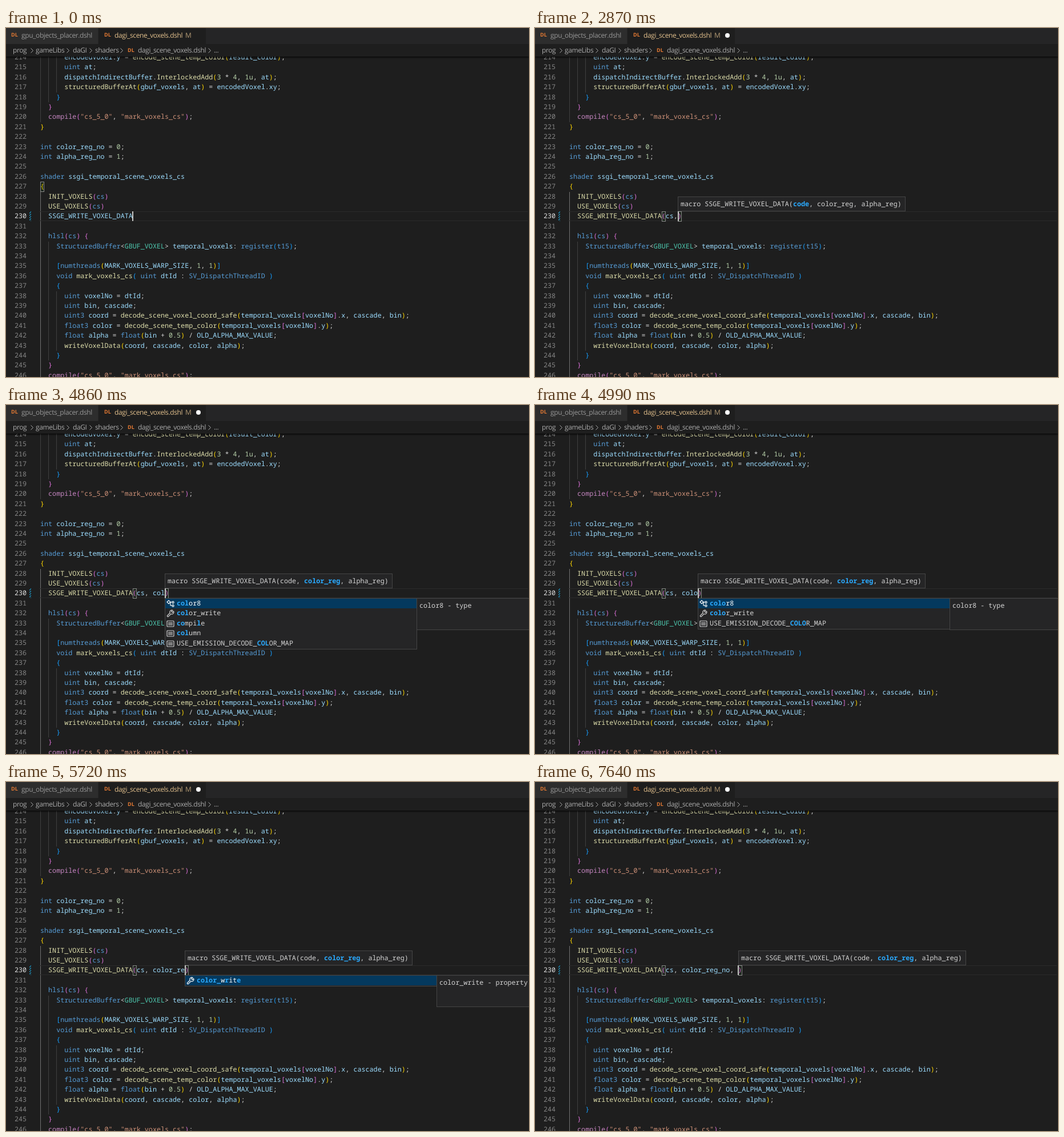
Animation of 916x611 px, one loop 8 s. Source, as an HTML page:

```html
<!DOCTYPE html>
<html lang="en">
<head>
<meta charset="utf-8">
<title>Shader editor</title>
<style>
html, body { margin: 0; width: 100%; height: 100%; overflow: hidden; background: #1e1e1e; }
#stage {
  position: relative; width: 916px; height: 611px; overflow: hidden; background: #1e1e1e;
  color: #d4d4d4; text-rendering: geometricPrecision;
  font: 500 11.733px/17.4px "Noto Sans Mono", monospace;
}
#stage div, #stage svg, .ui { position: absolute; }
#stage div, .ui { white-space: pre; box-sizing: border-box; }
.ui { font: 12px/18px "Open Sans", sans-serif; letter-spacing: -.4px; }
#stage .tag { font: bold 9px/12px "Open Sans", sans-serif; color: #e37933; }
#tabs { left: 0; top: 0; width: 916px; height: 28px; background: #252526; }
#tabs .old { left: 0; top: 0; width: 161px; height: 28px; background: #2d2d2d; }
#tabs .now { left: 162px; top: 0; width: 188px; height: 28px; background: #1e1e1e; }
#dot { left: 333px; top: 9px; width: 8px; height: 8px; border-radius: 50%; background: #fff; }
#crumbs { left: 0; top: 28px; width: 916px; height: 22px; background: #1e1e1e; color: #a9a9a9; box-shadow: 0 1px 3px #000; }
#crumbs svg { top: 7px; width: 5px; height: 9px; fill: none; stroke: #a9a9a9; }
.num { left: 0; width: 36px; text-align: right; color: #858585; }
.num.on { color: #e0e0e0; }
.guide { width: 1px; height: 17.5px; background: #404040; }
.guide.on { background: #707070; }
#row { left: 58px; top: 321px; width: 856px; height: 17px; border: solid #2b2b2b; border-width: 1px 0; }
#mark { left: 41px; top: 321px; width: 3px; height: 17px; background: repeating-linear-gradient(-45deg, #1b81a8 0 1.4px, #1e1e1e 1.4px 2.8px); }
.pair { width: 7px; height: 18px; border: 1px solid #888; background: rgba(0, 100, 0, .1); }
#caret { top: 321px; width: 2px; height: 17px; background: #c8c8c6; }
.panel { background: #252526; border: 1px solid #454545; }
#hint { top: 295px; width: 399px; height: 26px; padding: 4px 0 0 4px; }
#list { top: 338px; width: 442px; }
#info { top: 338px; width: 220px; height: 56px; padding: 4px 0 0 4px; }
.item { left: 0; width: 440px; height: 17.4px; padding-left: 20px; }
.item.on { background: #04395e; color: #fff; }
.item svg { left: 2px; top: 2px; width: 14px; height: 14px; fill: none; stroke: currentColor; stroke-width: 1.2; }
b { color: #2aaaff; }
</style>
</head>
<body>
<div id="stage">
  <div id="code"></div>
  <div id="row"></div>
  <div id="mark"></div>
  <div id="live"></div>
  <div id="crumbs"></div>
  <div id="tabs">
    <div class="old"></div><div class="now"></div>
    <div class="tag" style="left:9px;top:6px">DL</div>
    <span class="ui" style="left:27px;top:4px;color:#969696">gpu_objects_placer.dshl</span>
    <div class="tag" style="left:172px;top:6px">DL</div>
    <span class="ui" style="left:190px;top:4px;color:#e2c08d">dagi_scene_voxels.dshl</span>
    <span class="ui" style="left:314px;top:4px;color:#b39a74">M</span>
    <div id="dot"></div>
  </div>
</div>
<script>
const CHAR = 7.04, LINE = 17.4, LEFT = 60, FIRST = 214, TOP = 42.9, LOOP = 8000;
const EDIT = 230, MACRO = 'SSGE_WRITE_VOXEL_DATA';
const $ = id => document.getElementById(id);
const colX = col => LEFT + col * CHAR;
const rowY = n => TOP + (n - FIRST) * LINE;
const esc = s => s.replace(/&/g, '&amp;').replace(/</g, '&lt;');

const source = `      encodedVoxel.y = encode_scene_temp_color(result_color);
      uint at;
      dispatchIndirectBuffer.InterlockedAdd(3 * 4, 1u, at);
      structuredBufferAt(gbuf_voxels, at) = encodedVoxel.xy;
    }
  }
  compile("cs_5_0", "mark_voxels_cs");
}

int color_reg_no = 0;
int alpha_reg_no = 1;

shader ssgi_temporal_scene_voxels_cs
{
  INIT_VOXELS(cs)
  USE_VOXELS(cs)


  hlsl(cs) {
    StructuredBuffer<GBUF_VOXEL> temporal_voxels: register(t15);

    [numthreads(MARK_VOXELS_WARP_SIZE, 1, 1)]
    void mark_voxels_cs( uint dtId : SV_DispatchThreadID )
    {
      uint voxelNo = dtId;
      uint bin, cascade;
      uint3 coord = decode_scene_voxel_coord_safe(temporal_voxels[voxelNo].x, cascade, bin);
      float3 color = decode_scene_temp_color(temporal_voxels[voxelNo].y);
      float alpha = float(bin + 0.5) / OLD_ALPHA_MAX_VALUE;
      writeVoxelData(coord, cascade, color, alpha);
    }
  }
  compile("cs_5_0", "mark_voxels_cs");`.split('\n');

// Syntax colouring, with bracket colours cycling by depth
const keyword = /^(int|uint3?|float3?|void|shader|hlsl|StructuredBuffer|register|t15|numthreads|SV_DispatchThreadID)$/;
const brackets = ['#ffd700', '#da70d6', '#179fff'];

function wordColor(word, before, after) {
  if (word[0] === '"') return '#ce9178';
  if (/^\d/.test(word)) return '#b5cea8';
  if (keyword.test(word)) return '#569cd6';
  if (word === 'cs' && before === '(' && after === ')') return '#569cd6';
  if (word === 'GBUF_VOXEL') return '#4ec9b0';
  if (word === 'compile') return '#c586c0';
  return after === '(' ? '#dcdcaa' : '#9cdcfe';
}

function paint(text, depth) {
  const html = text.replace(/"[^"]*"|\d[\d.]*\w*|[A-Za-z_]\w*|[()[\]{}]|[^\w"()[\]{}]+/g, (tok, at) => {
    let color;
    if ('([{'.includes(tok)) color = brackets[depth++ % 3];
    else if (')]}'.includes(tok)) color = brackets[--depth % 3];
    else if (/^["\w]/.test(tok)) color = wordColor(tok, text[at - 1], text[at + tok.length]);
    else return esc(tok);
    return `<span style="color:${color}">${tok}</span>`;
  });
  return { html, depth };
}

const box = (cls, x, y, html = '') => `<div class="${cls}" style="left:${x}px;top:${y}px">${html}</div>`;

function buildCode() {
  let out = '', depth = 3;
  source.forEach((text, i) => {
    const n = FIRST + i, y = rowY(n);
    const model = n === EDIT ? source[i - 1] : text || source[i + 1];
    for (let c = 0; c < model.search(/\S/); c += 2)
      out += box('guide' + (c === 0 && n > 227 ? ' on' : ''), Math.round(colX(c)), y);
    const line = paint(text, depth);
    depth = line.depth;
    out += box('num' + (n === EDIT ? ' on' : ''), 0, y, n) + box('', LEFT, y, line.html);
  });
  $('code').innerHTML = out;
}

function buildCrumbs() {
  const parts = [['prog', 12], ['gameLibs', 52], ['daGI', 117], ['shaders', 156], ['dagi_scene_voxels.dshl', 231], ['...', 364]];
  $('crumbs').innerHTML =
    parts.map(([s, x]) => `<span class="ui" style="left:${x}px;top:2px">${s}</span>`).join('') +
    [43, 106, 146, 200, 354].map(x => `<svg style="left:${x}px" viewBox="0 0 5 9"><path d="M.5 .5l4 4-4 4"/></svg>`).join('') +
    box('tag', 213, 5, 'DL');
}

// Suggestions
const icons = {
  type: '<path d="M1 4l3-3 3 3-3 3zM6 4h4M7 4v6h3"/><circle cx="11.5" cy="4.5" r="1.6"/><circle cx="11.5" cy="10.5" r="1.6"/>',
  property: '<path d="M12.6 3.2l-2 2-1.8-1.8 2-2a3.5 3.5 0 0 0-4.6 4.6l-4.6 4.6a1.3 1.3 0 0 0 1.8 1.8L8 7.8a3.5 3.5 0 0 0 4.6-4.6z"/>',
  macro: '<rect x="1" y="2" width="12" height="10" rx="1"/><path d="M3 5h8M3 7h8M3 9h8"/>'
};
const words = ['color8', 'color_write', 'compile', 'const', 'continue', 'coord', 'cos', 'cosh', 'count', 'countbits', 'column', 'USE_EMISSION_DECODE_COLOR_MAP'];
const kind = w => w === 'color8' ? 'type' : w === 'color_write' ? 'property' : 'macro';

// Positions of the matched letters, or null
function match(word, query) {
  const low = word.toLowerCase(), at = low.indexOf(query), hits = [];
  if (at >= 0) return [...query].map((_, i) => at + i);
  let from = 0;
  for (const ch of query) {
    const i = low.indexOf(ch, from);
    if (i < 0) return null;
    hits.push(i);
    from = i + 1;
  }
  return hits;
}

function suggest(query, x) {
  const found = words.filter(w => match(w, query));
  const rows = found.map((w, i) => {
    const hits = match(w, query);
    const label = [...w].map((ch, k) => hits.includes(k) ? `<b>${ch}</b>` : ch).join('');
    return box('item' + (i ? '' : ' on'), 0, i * LINE, `<svg viewBox="0 0 14 14">${icons[kind(w)]}</svg>${label}`);
  }).join('');
  return `<div id="info" class="panel" style="left:${x + 441}px">${found[0]} - ${kind(found[0])}</div>` +
    `<div id="list" class="panel" style="left:${x}px;height:${found.length * LINE + 3}px">${rows}</div>`;
}

function hint(active, x) {
  const args = ['code', 'color_reg', 'alpha_reg'].map((a, i) => i === active - 1 ? `<b>${a}</b>` : a);
  return `<div id="hint" class="panel" style="left:${x}px">macro ${MACRO}(${args.join(', ')})</div>`;
}

// time, typed arguments, caret, highlighted parameter, suggestions, matched pair
const steps = [
  [0, null, 1, 0, 0, 1], [190, null, 0, 0, 0, 1], [730, null, 1, 0, 0, 1],
  [1190, '', 1, 0, 0, 0], [1260, '', 1, 0], [1660, '', 0, 0], [1730, '', 0, 1], [2200, '', 1, 1],
  [2400, 'c', 1, 1], [2470, 'cs', 1, 1], [2870, 'cs,', 1, 1], [3070, 'cs, ', 1, 1],
  [3600, 'cs, ', 0, 1], [3730, 'cs, ', 0, 2], [4060, 'cs, ', 1, 2], [4460, 'cs, c', 1, 2],
  [4660, 'cs, co', 1, 2], [4730, 'cs, co', 1, 2, 1], [4860, 'cs, col', 1, 2, 1],
  [4990, 'cs, colo', 1, 2, 1], [5120, 'cs, color', 1, 2, 1], [5450, 'cs, color_', 1, 2, 1],
  [5650, 'cs, color_r', 1, 2, 1], [5720, 'cs, color_re', 1, 2, 1], [5850, 'cs, color_reg', 1, 2],
  [6190, 'cs, color_reg_', 1, 2], [6450, 'cs, color_reg_n', 1, 2], [6710, 'cs, color_reg_no', 1, 2],
  [7240, 'cs, color_reg_no', 0, 2], [7310, 'cs, color_reg_no,', 1, 2], [7640, 'cs, color_reg_no, ', 1, 2]
];

function draw([, typed, caret, param, open, pair = 1]) {
  const called = typed !== null, y = rowY(EDIT), start = 2 + MACRO.length;
  const col = called ? start + 1 + typed.length : start;
  const x = Math.round(colX(col));
  let out = '';
  if (!called || !pair) out += box('pair', LEFT, Math.round(rowY(227)));
  else out += box('pair', Math.round(colX(start)), 321) + box('pair', x, 321);
  out += box('', colX(2), y, paint(called ? `${MACRO}(${typed})` : MACRO, 1).html);
  if (param) out += hint(param, x);
  if (open) out += suggest(typed.split(' ').pop(), x);
  if (caret) out += `<div id="caret" style="left:${Math.floor(colX(col))}px"></div>`;
  $('live').innerHTML = out;
  $('dot').style.display = called ? '' : 'none';
}

let shown;
function tick() {
  const t = performance.now() % LOOP;
  const step = steps.findLast(s => s[0] <= t);
  if (step !== shown) draw(shown = step);
  requestAnimationFrame(tick);
}

buildCode();
buildCrumbs();
tick();
</script>
</body>
</html>
```
